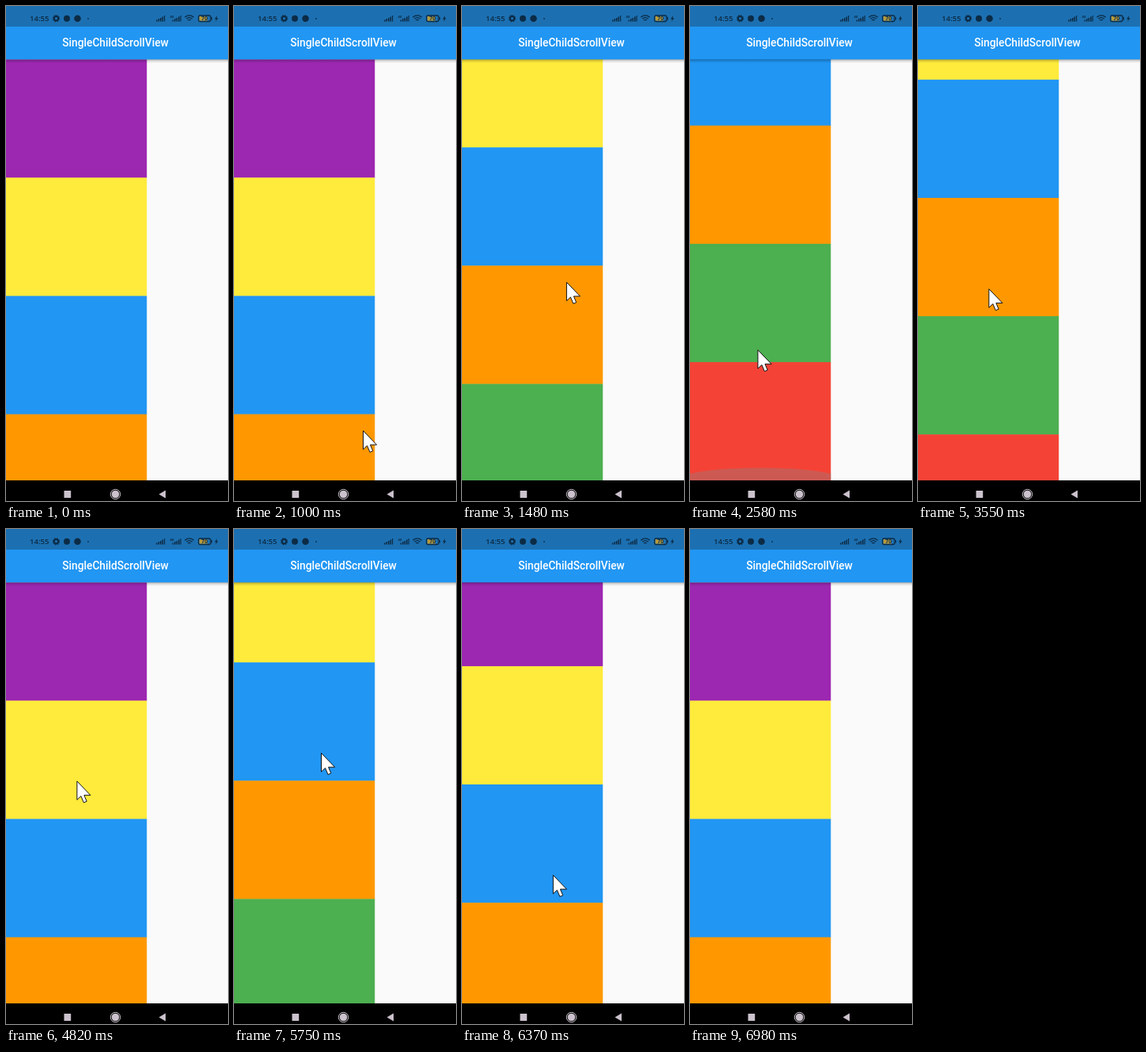
Recreate the animation shown at these times as an HTML page. Size 281 by 624 pixels, loop 7.59 s.

```html
<!DOCTYPE html>
<html lang="en">
<head>
<meta charset="utf-8">
<title>Scroll view demo</title>
<style>
  html, body { margin: 0; width: 100%; height: 100%; overflow: hidden; background: #fafafa; }
  svg { display: block; width: 100%; height: 100%; }
  .title { font: 500 13.75px Roboto, sans-serif; fill: #fff; text-anchor: middle; }
  .clock { font: 600 9.6px "Open Sans", sans-serif; }
  .level { font: 700 7px Roboto, sans-serif; text-anchor: middle; }
  .net { font: 700 4px Roboto, sans-serif; }
</style>
</head>
<body>
<svg viewBox="0 0 281 624">
  <defs>
    <linearGradient id="shade" x2="0" y2="1">
      <stop offset="0" stop-opacity=".34"/>
      <stop offset=".4" stop-opacity=".14"/>
      <stop offset="1" stop-opacity="0"/>
    </linearGradient>
    <clipPath id="view"><rect y="67" width="178.5" height="531"/></clipPath>
    <path id="bars" d="M0 19.5v-2h1.6v2zM2.5 19.5v-3.4h1.6v3.4zM5 19.5v-4.6h1.6v4.6zM7.5 19.5v-6h1.6v6zM10 19.5v-7.5h1.2v7.5z"/>
  </defs>

  <rect width="281" height="624" fill="#fafafa"/>
  <g clip-path="url(#view)">
    <g id="list"></g>
    <ellipse id="glow" cx="89" cy="598" rx="105" fill="#7a8a90"/>
  </g>

  <rect y="67" width="281" height="5" fill="url(#shade)"/>
  <rect y="26" width="281" height="41.3" fill="#2196f3"/>
  <rect width="281" height="26" fill="#1c70b2"/>
  <text class="title" x="138.5" y="51">SingleChildScrollView</text>

  <g fill="#0c2b45">
    <text class="clock" x="30" y="19">14:55</text>
    <circle cx="63.5" cy="15.7" r="2.6" fill="none" stroke="#0c2b45" stroke-width="2"/>
    <circle cx="63.5" cy="15.7" r="3.9" fill="none" stroke="#0c2b45" stroke-width="1.2" stroke-dasharray="1.8 1.26"/>
    <circle cx="77" cy="15.7" r="4"/>
    <circle cx="90.5" cy="15.7" r="4.3"/>
    <circle cx="104" cy="16" r=".9"/>
    <use href="#bars" x="190"/>
    <text class="net" x="207.5" y="14.5">4G</text>
    <use href="#bars" x="210.5"/>
    <g fill="none" stroke="#0c2b45" stroke-width="1.3">
      <path d="M226.3 14.2q5.7-4.6 11.4 0M228.3 16.2q3.7-3 7.4 0M230.2 18q1.8-1.4 3.6 0"/>
      <rect x="243.7" y="12" width="15.3" height="7.5" rx="2"/>
    </g>
    <rect x="244.8" y="13" width="10" height="5.5" fill="#b79a3c"/>
    <rect x="259.8" y="14" width="1.2" height="3.5"/>
    <text class="level" x="251.3" y="18.3">70</text>
    <path d="M267.3 11.8l-3.3 4.6h2l-.8 3.4 3.3-4.8h-2z"/>
  </g>

  <rect y="598" width="281" height="26"/>
  <g fill="#cbc2cd">
    <rect x="73.5" y="611" width="8.7" height="9"/>
    <circle cx="138.5" cy="615.5" r="4.8"/>
    <circle cx="138.5" cy="615.5" r="6.2" fill="none" stroke="#cbc2cd"/>
    <path d="M193.5 615.5l8.5-5v10z"/>
  </g>

  <path id="pointer" d="M.5.5V24L5.5 19.3 9 27.5 12.8 25.9 9.5 18.2H17.6Z"
        fill="#fff" stroke="#111" stroke-linejoin="round"/>
</svg>

<script>
const LOOP = 7590, TICK = 200 / 3;
const TOP = 67.3, BAND = 149.1, VIEW = 530.7, COAST = 110;
const colors = ['#9c27b0', '#ffeb3b', '#2196f3', '#ff9800', '#4caf50', '#f44336'];
const MAX = colors.length * BAND - VIEW;

const $ = id => document.getElementById(id);
const list = $('list'), glow = $('glow'), pointer = $('pointer');
const clamp = (v, lo, hi) => Math.min(hi, Math.max(lo, v));

colors.forEach((fill, i) => {
  const band = document.createElementNS('http://www.w3.org/2000/svg', 'rect');
  const attrs = { y: TOP + i * BAND, width: 178.5, height: BAND + 0.4, fill };
  for (const k in attrs) band.setAttribute(k, attrs[k]);
  list.append(band);
});

// Places where the pointer turns: time, x, y
const stops = [
  [70, 228, 563], [600, 117, 520], [930, 163, 535], [1740, 121, 282], [2250, 82, 520],
  [2980, 92, 265], [3270, 92, 265], [3700, 88, 400], [4080, 91, 267], [4570, 80, 400],
  [5130, 105, 180], [5740, 110, 282], [6400, 115, 440], [6910, 234, 593]
];
// Press time, release time, distance the list coasts afterwards
const drags = [
  [930, 1740, 120], [2250, 2980, 0], [3270, 3700, -64],
  [4080, 4570, -60], [4820, 5130, 70], [5740, 6400, -60]
];

function pointerAt(t) {
  t = clamp(t, stops[0][0], stops.at(-1)[0]);
  const i = Math.max(1, stops.findIndex(s => s[0] >= t));
  const [t0, x0, y0] = stops[i - 1], [t1, x1, y1] = stops[i];
  const u = (t - t0) / (t1 - t0), e = u * u * (3 - 2 * u);
  return [x0 + (x1 - x0) * e, y0 + (y1 - y0) * e];
}

// The list follows the pointer while pressed, then coasts; pulling past the end glows
function scrollAt(t) {
  let offset = 0, pull = 0;
  drags.forEach(([press, release, coast], i) => {
    if (t < press) return;
    const end = Math.min(t, drags[i + 1]?.[0] ?? LOOP);
    const held = offset + pointerAt(press)[1] - pointerAt(Math.min(end, release))[1];
    const decay = Math.exp(-Math.max(0, end - release) / COAST);
    offset = clamp(held + coast * (1 - decay), 0, MAX);
    pull = Math.max(0, held - MAX) * decay * decay;
  });
  return { offset, pull };
}

function draw() {
  const now = performance.now() % LOOP;
  const t = Math.floor((now - 3) / TICK) * TICK + 3;
  const [x, y] = pointerAt(t), { offset, pull } = scrollAt(t);
  list.setAttribute('transform', `translate(0 ${-offset})`);
  pointer.setAttribute('transform', `translate(${x} ${y})`);
  pointer.style.visibility = now >= 70 && now < 6970 ? 'visible' : 'hidden';
  glow.setAttribute('ry', 1.7 * Math.sqrt(pull));
  glow.setAttribute('opacity', Math.min(0.33, pull / 200));
  requestAnimationFrame(draw);
}
draw();
</script>
</body>
</html>
```
